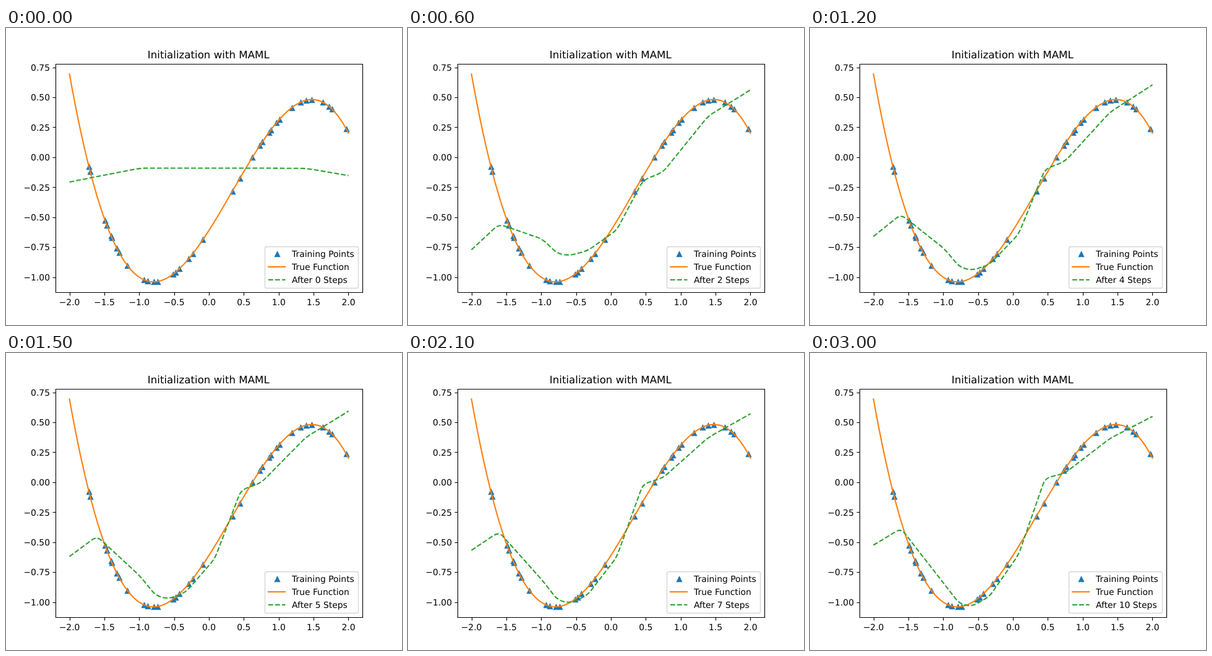
Animation, 640 px wide and 480 px high, one loop 3300 ms. Source, as an HTML page:

```html
<!DOCTYPE html>
<html lang="en">
<head>
<meta charset="utf-8">
<title>Initialization with MAML</title>
<style>
html, body { margin: 0; width: 100%; height: 100%; overflow: hidden; background: #fff; }
svg { display: block; width: 640px; height: 480px; }
text { font: 13.89px "DejaVu Sans", sans-serif; text-rendering: geometricPrecision; }
.title { font-size: 16.67px; }
.axis { fill: none; stroke: #000; stroke-width: 1.11; }
.line { fill: none; stroke-width: 2.083; stroke-linejoin: round; }
.truth { stroke: #ff7f0e; stroke-linecap: square; }
.fit { stroke: #2ca02c; stroke-dasharray: 7.71 3.33; }
.mark { fill: #1f77b4; stroke: #1f77b4; stroke-width: 1.39; }
.legend { fill: #fff; fill-opacity: .8; stroke: #ccc; stroke-opacity: .8; stroke-width: 1.39; }
</style>
</head>
<body>
<svg id="plot" viewBox="0 0 640 480"></svg>
<script>
const STEP_MS = 300, STEPS = 11;
const plot = document.getElementById('plot');

function add(tag, attrs, text) {
  const el = document.createElementNS('http://www.w3.org/2000/svg', tag);
  for (const k in attrs) el.setAttribute(k, attrs[k]);
  if (text) el.textContent = text;
  return plot.appendChild(el);
}

const px = x => 328 + 112.727 * x;
const py = y => 208.8 - 193.7 * y;
const dataX = p => (p - 328) / 112.727;
const snap = v => Math.round(v) + 0.5;
const relu = v => Math.max(0, v);
const point = p => p.map(v => v.toFixed(2)).join(' ');
const label = (x, y, text, anchor = 'start', cls = '') =>
  add('text', { x, y, 'text-anchor': anchor, class: cls }, text);
const triangle = (x, y) => `M${x} ${y - 4}l-4 8h8Z`;

// The cubic being learned.
function truth(x) {
  const u = x - 0.34;
  return -0.2795 - 0.2594 * (u ** 3 - 3.8715 * u);
}

// Corners of the fitted curve: x, then y after each of the key steps.
const keys = [2, 3, 5, 10];
const corners = [
  [102.5, 358.5, 347.5, 329, 310.5],
  [147, 317, 308.5, 296, 283.5],
  [217, 341, 351.5, 361, 373.5],
  [242, 365, 378.5, 392, 405.5],
  [262, 367.5, 382.5, 397.5, 409.5],
  [290, 360, 373.5, 387, 393.5],
  [337, 327, 331, 333, 326],
  [380, 246, 236, 221.5, 202.5],
  [412, 233, 222.5, 210, 194],
  [485, 142.5, 137, 136, 138],
  [553.5, 100, 91.5, 94, 102.5]
];

// Training starts nearly flat, jumps, then settles like a polynomial in 1/n.
function fitY(n, [x, ...ys]) {
  const start = 226.5 + 0.2 * relu(215 - x) + 0.17 * relu(x - 483);
  if (n < 2) return start + 0.77 * n * (ys[0] - start);
  return keys.reduce((sum, k, i) => {
    const w = keys.reduce((p, j) => j === k ? p : p * (1 / n - 1 / j) / (1 / k - 1 / j), 1);
    return sum + w * ys[i];
  }, 0);
}

function roundedPath(pts, radius) {
  const toward = (p, q) => {
    const t = Math.min(0.5, radius / Math.hypot(q[0] - p[0], q[1] - p[1]));
    return point([p[0] + t * (q[0] - p[0]), p[1] + t * (q[1] - p[1])]);
  };
  const bends = pts.slice(1, -1).map((p, i) =>
    `L${toward(p, pts[i])}Q${point(p)} ${toward(p, pts[i + 2])}`);
  return `M${point(pts[0])}${bends.join('')}L${point(pts[pts.length - 1])}`;
}

const fitPaths = Array.from({ length: STEPS }, (_, n) =>
  roundedPath(corners.map(c => [c[0], fitY(n, c)]), 10));

// Where the training points were drawn; their heights follow the cubic.
const samples = [134, 136, 160, 163, 170, 171, 179, 183, 196, 223, 229, 239, 245, 270, 274,
  280, 295, 302, 318, 366, 378, 398, 410, 414, 425, 428, 437, 442, 462, 476, 485, 494, 512,
  522, 527, 550];
add('path', {
  class: 'mark',
  d: samples.map(x => triangle(x + 0.5, snap(py(truth(dataX(x)))))).join('')
});

const curve = Array.from({ length: 101 }, (_, i) => {
  const x = -2 + i * 0.04;
  return point([px(x), py(truth(x))]);
});
add('path', { class: 'line truth', d: 'M' + curve.join('L') });
const fit = add('path', { class: 'line fit' });

const num = (v, digits) => (v < 0 ? '\u2212' : '') + Math.abs(v).toFixed(digits);
let ticks = 'M80.5 58.5H576.5V427.5H80.5Z';
for (let v = -2; v <= 2; v += 0.5) {
  ticks += `M${snap(px(v))} 427.5v5`;
  label(px(v), 448, num(v, 1), 'middle');
}
for (let v = -1; v <= 0.75; v += 0.25) {
  ticks += `M80.5 ${snap(py(v))}h-5`;
  label(71, Math.round(py(v) + 5.4), num(v, 2), 'end');
}
add('path', { class: 'axis', d: ticks });
label(327.3, 49, 'Initialization with MAML', 'middle', 'title');

add('rect', { class: 'legend', x: 418.5, y: 353.5, width: 151, height: 67, rx: 2.78 });
add('path', { class: 'mark', d: triangle(438.5, 365.5) });
add('path', { class: 'line truth', d: 'M424 386H451' });
add('path', { class: 'line fit', d: 'M424 407H451.5' });
label(462, 370, 'Training Points');
label(462, 391, 'True Function');
const caption = label(462, 412, 'After 0 Steps');

let shown = -1;
function draw() {
  const n = Math.floor(performance.now() / STEP_MS) % STEPS;
  if (n !== shown) {
    shown = n;
    fit.setAttribute('d', fitPaths[n]);
    caption.textContent = `After ${n} Steps`;
  }
  requestAnimationFrame(draw);
}
draw();
</script>
</body>
</html>
```
